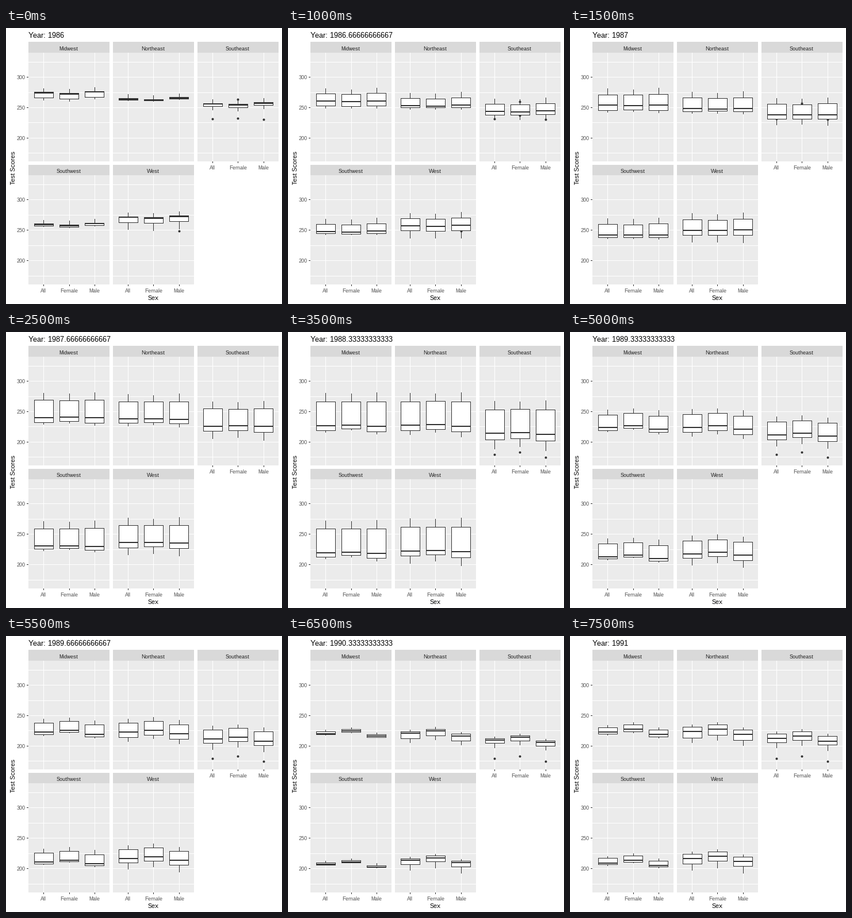
Recreate the animation shown at these times as a matplotlib script. Size 480 by 480 pixels, loop 8000 ms.

```python
import numpy as np
import matplotlib.pyplot as plt
from matplotlib.animation import FuncAnimation
from matplotlib.patches import Circle, Rectangle

SIZE, DPI = 480, 100
FRAMES, INTERVAL = 16, 500
plt.rcParams.update({"font.family": "Liberation Sans", "text.hinting": "native",
                     "text.hinting_factor": 1, "toolbar": "None"})

DARK, PANEL, STRIP, AXIS = "#333333", "#ebebeb", "#d9d9d9", "#4d4d4d"
PANEL_W, PANEL_H, STRIP_H = 141, 189.45, 18.55
UNIT = PANEL_W / 3.2
KEY_TIMES = [0, 7, 13, 15]
SEXES = {"All": 0, "Female": -1, "Male": 1}

# Medians and lower tails at the first three keys; share of the tail inside the box
REGIONS = {
    "Midwest": ([274, 227, 220.7], [11.3, 10.4, 2.3], 0.7),
    "Northeast": ([264, 227.4, 221], [2, 14.7, 14.7], 0.55),
    "Southeast": ([256, 214.2, 210], [9.3, 25, 12.3], 0.4),
    "Southwest": ([259, 219.2, 206.8], [3, 9.4, 1], 0.65),
    "West": ([271, 222.2, 213.7], [19.6, 19.8, 16.1], 0.4),
}
# Height of upper whisker and upper hinge above the median
UPPER = [(8, 1.5), (53.5, 39.5), (6, 3)]
RISE = np.array([8, 7.3, 2.6, 1, -0.3])
# Lead of male scores over the middle, from upper to lower whisker
LEAD = [np.full(5, 1.5), np.linspace(1, -3.4, 5), np.full(5, -4.2), np.full(5, -4.2)]

# Outliers drift to their mean until the second key, then new ones hold
EARLY = {("Southeast", "All"): [231.5], ("Southeast", "Female"): [264, 233],
         ("Southeast", "Male"): [230.5], ("West", "Male"): [249]}
LATE = {("Southeast", sex): [179.2 - 4.3 * sign] for sex, sign in SEXES.items()}

fig = plt.figure(figsize=(SIZE / DPI, SIZE / DPI), dpi=DPI, facecolor="white")
ax = fig.add_axes([0, 0, 1, 1])
ax.set(xlim=(0, SIZE), ylim=(SIZE, 0))
ax.axis("off")


def bar(x, y, w, h, color, z=1):
    patch = Rectangle((x, y), w, h, fc=color, lw=0, zorder=z, antialiased=False)
    return ax.add_patch(patch)


def label(x, y, text, px, color="black", **kw):
    return ax.text(x, y, text, fontsize=px * 72 / DPI, color=color, **kw)


def origin(index):
    row, col = divmod(index, 3)
    return 39 + 146.99 * col, 43 + 213.1 * row


def score_y(score, top):
    return top + 42.55 + (300 - score) * 1.059


def center(left, slot):
    return left + (0.6 + slot) * UNIT


def draw_panel(index, name):
    left, top = origin(index)
    x, y0, y1, y2 = (round(v) for v in (left, top - STRIP_H, top, top + PANEL_H))
    bar(x, y0, PANEL_W, y1 - y0, STRIP)
    bar(x, y1, PANEL_W, y2 - y1, PANEL)
    label(left + PANEL_W / 2 - 0.7, y1 - 4, name, 9, "#1a1a1a", ha="center")
    for score in range(175, 326, 25):
        y = int(score_y(score, top))
        bar(x, y, PANEL_W, 1, "white")
        if score % 50 == 0 and index % 3 == 0:
            bar(x - 3, y, 3, 1, DARK)
            label(x - 5, y + 4, str(score), 9, AXIS, ha="right")
    for slot, sex in enumerate(SEXES):
        mid = center(left, slot)
        bar(round(mid), y1, 1, y2 - y1, "white")
        if index >= 2:
            bar(round(mid), y2, 1, 3, DARK)
            label(mid, y2 + 14, sex, 9, AXIS, ha="center")


def key_stats(region, sex):
    """Five-number summaries, upper whisker first, at every key time."""
    medians, tails, share = REGIONS[region]
    keys = [mid + np.array([hi, q3, 0, -share * tail, -tail])
            for mid, tail, (hi, q3) in zip(medians, tails, UPPER)]
    keys.append(keys[-1] + RISE)
    return np.array(keys) + SEXES[sex] * np.array(LEAD)


class Box:
    def __init__(self, index, region, slot, sex):
        self.keys = key_stats(region, sex)
        self.early = EARLY.get((region, sex), [])
        self.late = LATE.get((region, sex), [])
        left, self.top = origin(index)
        mid = center(left, slot)
        x0, x1 = round(mid - 16.5), round(mid + 16.5) + 1
        self.x = round(mid)
        self.dots = [ax.add_patch(Circle((0, 0), 2, fc=DARK, lw=0, zorder=2)) for _ in self.early]
        self.whisker = bar(self.x, 0, 1, 1, DARK, 3)
        self.frame = bar(x0, 0, x1 - x0, 1, DARK, 4)
        self.fill = bar(x0 + 1, 0, x1 - x0 - 2, 1, "white", 5)
        self.median = bar(x0, 0, x1 - x0, 2, DARK, 6)

    def outliers(self, i):
        if i >= KEY_TIMES[1]:
            return self.late
        return [s + (np.mean(self.early) - s) * i / KEY_TIMES[1] for s in self.early]

    def update(self, i):
        stats = [np.interp(i, KEY_TIMES, track) for track in self.keys.T]
        hi, q3, mid, q1, lo = (round(score_y(s, self.top)) for s in stats)
        for patch, y0, y1 in ((self.whisker, hi, lo + 1), (self.frame, q3, q1 + 1),
                              (self.fill, q3 + 1, max(q1, q3 + 1)), (self.median, mid - 1, mid + 1)):
            patch.set_y(y0)
            patch.set_height(y1 - y0)
        for dot in self.dots:
            dot.set_visible(False)
        for dot, score in zip(self.dots, self.outliers(i)):
            dot.center = self.x + 0.5, round(score_y(score, self.top)) + 0.5
            dot.set_visible(True)


boxes = []
for n, region in enumerate(REGIONS):
    draw_panel(n, region)
    boxes += [Box(n, region, slot, sex) for slot, sex in enumerate(SEXES)]
title = label(39, 17, "", 13)
label(256.5, 473, "Sex", 11, ha="center")
label(18, 243, "Test Scores", 11, rotation=90, ha="right", va="center")


def update(i):
    title.set_text(f"Year: {1986 + i / 3:.15g}")
    for box in boxes:
        box.update(i)


anim = FuncAnimation(fig, update, frames=FRAMES, interval=INTERVAL, init_func=lambda: None,
                     repeat=True, repeat_delay=0, cache_frame_data=False)
plt.show()
```
